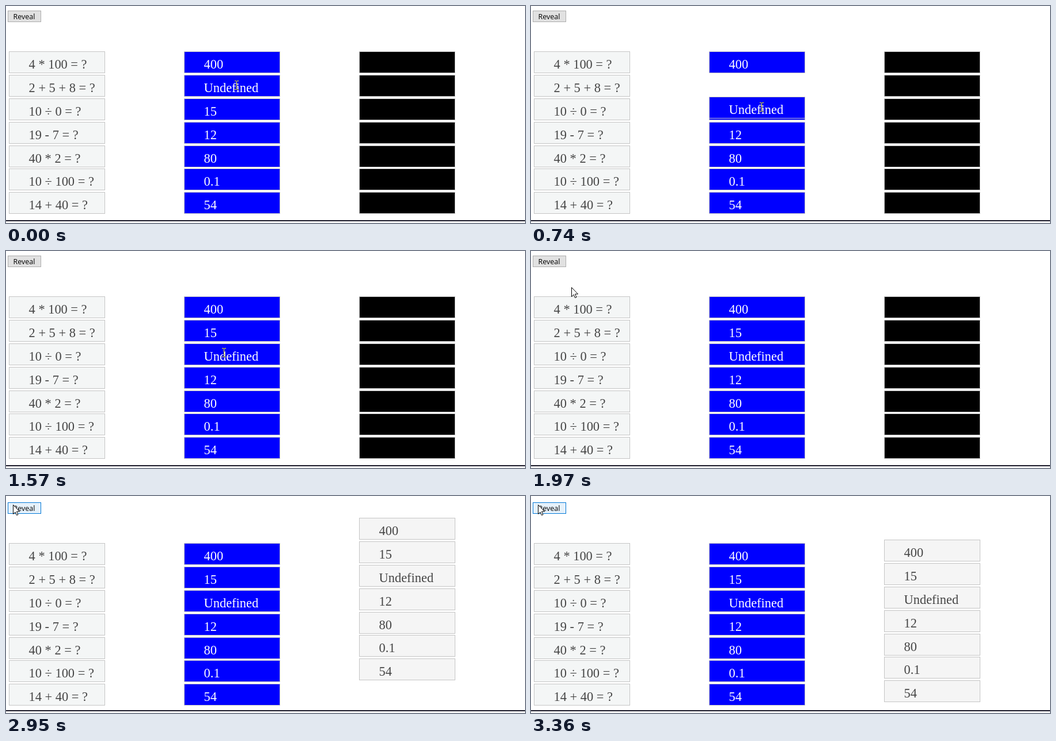
Recreate the animation shown at these times as an HTML page with a canvas. Size 901 by 378 pixels, loop 3410 ms.

```html
<!DOCTYPE html>
<html lang="en">
<head>
<meta charset="utf-8">
<title>Sortable quiz</title>
<style>
html, body { margin: 0; width: 100%; height: 100%; overflow: hidden; background: #fff; }
canvas { display: block; }
</style>
</head>
<body>
<canvas id="stage" width="901" height="378"></canvas>
<script>
const ctx = document.getElementById('stage').getContext('2d');
const LOOP = 3410, TOP = 79.3, PITCH = 40.83;
const DROP = 1480, HOVER = 2490, REVEAL = 2850;

const questions = ['4 * 100 = ?', '2 + 5 + 8 = ?', '10 ÷ 0 = ?', '19 - 7 = ?',
  '40 * 2 = ?', '10 ÷ 100 = ?', '14 + 40 = ?'];
const answers = ['400', '15', 'Undefined', '12', '80', '0.1', '54'];

const plain = { fill: '#f4f6f6', ink: '#454545' };
const blue = { fill: '#0000ff', ink: '#ffffff' };
const black = { fill: '#000000', ink: '#000000' };
const shown = { fill: '#f5f5f5', ink: '#454545' };

// [time, values...]
const dragPath = [[140, 120], [460, 143], [690, 157], [740, 158], [1100, 165]];
const arrowPath = [[1480, 400, 184], [1590, 360, 172], [1820, 190, 110], [1970, 70, 63],
  [2000, 34, 43], [2050, 25, 37], [2100, 18, 32], [2150, 14, 29], [2390, 14, 29], [2620, 12, 15]];

function along(path, t) {
  if (t <= path[0][0]) return path[0].slice(1);
  for (let i = 1; i < path.length; i++) {
    const a = path[i - 1], b = path[i];
    if (t <= b[0]) {
      const k = (t - a[0]) / (b[0] - a[0]);
      return a.slice(1).map((v, j) => v + (b[j + 1] - v) * k);
    }
  }
  return path[path.length - 1].slice(1);
}

// The screen refreshes in a 230 ms rhythm: one 30 ms step, then four of 50 ms.
function tick(t) {
  const base = t < 1240 ? 380 : t < 2200 ? 1970 : 2950;
  const cycle = Math.floor((t - base) / 230) * 230;
  const rest = t - base - cycle;
  return base + cycle + (rest < 30 ? 0 : 30 + Math.floor((rest - 30) / 50) * 50);
}

function dragY(t) {
  return Math.round(along(dragPath, t)[0]);
}

function frame(x, y, w, h, fill, edge) {
  ctx.fillStyle = edge;
  ctx.fillRect(x, y, w, h);
  ctx.fillStyle = fill;
  ctx.fillRect(x + 1, y + 1, w - 2, h - 2);
}

function item(x, y, label, look) {
  frame(x, Math.round(y), 167, 38, look.fill, '#c5c5c5');
  ctx.fillStyle = look.ink;
  ctx.font = '22.4px "Liberation Serif", "Times New Roman", serif';
  ctx.fillText(label, x + 34.6, Math.round(y + 30));
}

function list(x, y, labels, look) {
  labels.forEach((label, i) => {
    if (label !== null) item(x, y + i * PITCH, label, look);
  });
}

function button(y, hot) {
  frame(3, y, 58, 20, hot ? '#e5f1fb' : '#e1e1e1', hot ? '#0078d7' : '#adadad');
  ctx.fillStyle = '#000';
  ctx.font = '12.5px "Open Sans", "Noto Sans", sans-serif';
  ctx.fillText('Reveal', 12.5, y + 15);
}

function beam(x, y) {
  ctx.globalCompositeOperation = 'difference';
  ctx.fillStyle = '#fff';
  for (const end of [y - 8, y + 7]) {
    ctx.fillRect(x - 3, end, 3, 1);
    ctx.fillRect(x + 1, end, 3, 1);
  }
  ctx.fillRect(x, y - 7, 1, 14);
  ctx.globalCompositeOperation = 'source-over';
}

function arrow(x, y) {
  ctx.save();
  ctx.translate(x + 0.5, y + 0.5);
  ctx.beginPath();
  ctx.moveTo(0, 0);
  for (const [px, py] of [[0, 16], [3.5, 12.5], [6, 18], [8.5, 17], [6, 11.5], [11, 11.5]]) {
    ctx.lineTo(px, py);
  }
  ctx.closePath();
  ctx.fillStyle = '#fff';
  ctx.strokeStyle = '#000';
  ctx.lineWidth = 1;
  ctx.fill();
  ctx.stroke();
  ctx.restore();
}

function middle(t, now, top) {
  if (t >= DROP) {
    list(309, top, answers, blue);
    return;
  }
  const y = t < 180 ? 120 : t < 1240 ? dragY(now) : 166;
  const rest = answers.slice();
  rest[2] = null;
  if (y < 162) [rest[1], rest[2]] = [null, '15'];
  list(309, top, rest, blue);
  item(309, y, 'Undefined', blue);
}

function pointer(t, now) {
  if (t < DROP) {
    // The dragged item trails the mouse slightly.
    const y = t < 180 ? 120 : t < 1240 ? dragY(now + 24) : 166;
    beam(400, y + 18);
    return;
  }
  const [x, y] = along(arrowPath, now).map(Math.round);
  if (x > 344) beam(x, y);
  else arrow(x, y);
}

function draw(t) {
  const now = tick(t);
  const open = t >= REVEAL;
  const shift = open ? 3 : 0;
  const top = TOP + shift;

  ctx.fillStyle = '#fff';
  ctx.fillRect(0, 0, 901, 378);
  ctx.fillStyle = '#1b1a29';
  ctx.fillRect(0, 373, 901, 2);

  button(8 + shift, t >= HOVER);
  list(5, top, questions, plain);
  middle(t, now, top);
  if (open) {
    const s = now - 2950;
    list(613, top - 44 + 0.0796 * s + 3.18e-5 * s * s, answers, shown);
  } else {
    list(613, top, answers, black);
  }
  pointer(t, now);
}

const start = performance.now();
function loop() {
  draw((performance.now() - start) % LOOP);
  requestAnimationFrame(loop);
}
loop();
</script>
</body>
</html>
```
